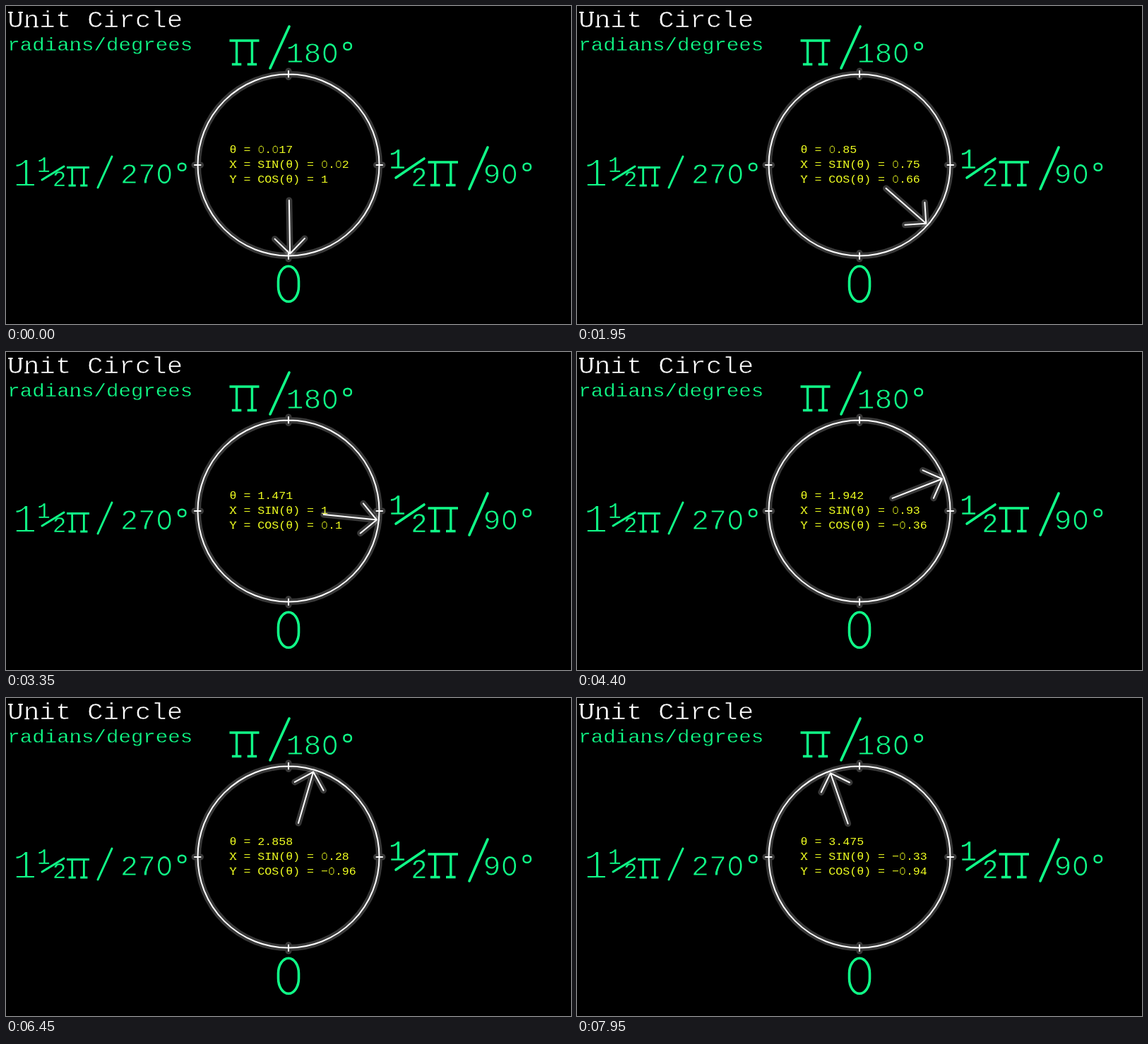
Write an HTML page with a canvas that moves like this. It is 800 px wide and 450 px high and loops after 8000 ms.

```html
<!DOCTYPE html>
<html lang="en">
<head>
<meta charset="utf-8">
<title>Unit Circle</title>
<style>
html, body { margin: 0; width: 100%; height: 100%; overflow: hidden; background: #000; }
canvas { display: block; width: 800px; height: 450px; }
</style>
</head>
<body>
<canvas id="stage" width="800" height="450"></canvas>
<script>
const ctx = document.getElementById('stage').getContext('2d');
const GREEN = '#10ff88', YELLOW = '#f0ff20', WHITE = '#fff';
const HALO = 'rgba(255,255,255,.22)';
const CX = 400, CY = 225, R = 128.5;
const LOOP = 8000, STEP = 50;

// Angle in radians at given times, in ms
const angles = [[0, .017], [1950, .85], [3350, 1.471], [4400, 1.942],
                [5250, 2.325], [6450, 2.858], [7950, 3.475]];

// Slab feet in em from the glyph origin, y upwards
const SLABS = {
  U: [[.11, .64], [.49, .64]],
  n: [[.13, .02], [.47, .02]],
  X: [[.1, .64], [.5, .64], [.1, .02], [.5, .02]],
  Y: [[.1, .64], [.5, .64], [.3, .02]],
  N: [[.11, .64], [.11, .02], [.49, .64]]
};

function angleAt(t) {
  let i = 1;
  while (i < angles.length - 1 && t > angles[i][0]) i++;
  const [t0, a0] = angles[i - 1], [t1, a1] = angles[i];
  return a0 + (a1 - a0) * (t - t0) / (t1 - t0);
}

function oval(x, y, w, h, width) {
  ctx.lineWidth = width;
  ctx.beginPath();
  ctx.roundRect(x - w / 2, y - h / 2, w, h, { x: w / 2, y: h * .43 });
  ctx.stroke();
}

// Monospaced text with thin strokes, open zeros and slab feet
function write(text, x, y, size, color, { squash = 1, thin = .024 } = {}) {
  ctx.font = `${size}px "Liberation Mono", monospace`;
  ctx.fillStyle = ctx.strokeStyle = color;
  ctx.save();
  ctx.translate(x, y);
  ctx.scale(1, squash);
  for (const ch of text) {
    if (ch === '0') {
      oval(size * .3, -size * .33, size * .38, size * .61, size * .06);
    } else if (ch === '°') {
      oval(size * .3, -size * .57, size * .25, size * .25, size * .06);
    } else {
      ctx.fillText(ch, 0, 0);
      if (thin) {
        ctx.strokeStyle = '#000';
        ctx.lineWidth = size * thin;
        ctx.strokeText(ch, 0, 0);
        ctx.strokeStyle = color;
      }
      for (const [sx, sy] of SLABS[ch] || [])
        ctx.fillRect((sx - .09) * size, -(sy + .026) * size, .18 * size, .052 * size);
    }
    ctx.translate(size * .6, 0);
  }
  ctx.restore();
}

function lines(color, width, ...segments) {
  ctx.strokeStyle = color;
  ctx.lineWidth = width;
  ctx.beginPath();
  for (const [x0, y0, x1, y1] of segments) {
    ctx.moveTo(x0, y0);
    ctx.lineTo(x1, y1);
  }
  ctx.stroke();
}

function bigPi(x, y, w, h, width) {
  const a = x + w * .24, b = x + w * .76, s = w * .16, base = y + h;
  ctx.lineCap = 'butt';
  lines(GREEN, width, [x, y, x + w, y], [a, y, a, base], [b, y, b, base],
    [a - s, base, a + s, base], [b - s, base, b + s, base]);
  ctx.lineCap = 'round';
}

function labels() {
  write('Unit Circle', 2.2, 30, 37.6, WHITE, { squash: .87, thin: .02 });
  write('radians/degrees', 2.3, 62.5, 29.1, GREEN, { squash: .87, thin: .012 });

  const degrees = { squash: .98, thin: .02 };
  bigPi(316.5, 49, 42, 33.5, 3.4);
  lines(GREEN, 3.6, [374, 88, 401, 29]);
  write('180°', 396.5, 80, 41.5, GREEN, degrees);

  write('1', 542, 230, 40, GREEN, { thin: .01 });
  write('2', 573.5, 255, 38, GREEN, { thin: .01 });
  lines(GREEN, 3.6, [552, 243, 592, 216]);
  bigPi(597.5, 221, 42.5, 32.5, 3.4);
  lines(GREEN, 3.6, [656, 259, 682, 200]);
  write('90°', 675.5, 251, 41.5, GREEN, degrees);

  write('1', 9.5, 254.5, 57, GREEN, { thin: .035 });
  write('1', 44, 235, 31, GREEN, { thin: .01 });
  write('2', 66, 254.5, 32, GREEN, { thin: .01 });
  lines(GREEN, 3, [51, 246, 82, 227]);
  bigPi(86, 228.5, 32, 25.5, 2.8);
  lines(GREEN, 3, [130, 257, 150, 213]);
  write('270°', 162, 251, 41.5, GREEN, degrees);

  ctx.strokeStyle = GREEN;
  oval(400, 393.3, 29, 50, 3.6);
}

const round = (v, digits) => String(+v.toFixed(digits)).replace('-', '\u2212');

function readout(a) {
  const rows = [
    `θ = ${round(a, 3)}`,
    `X = SIN(θ) = ${round(Math.sin(a), 2)}`,
    `Y = COS(θ) = ${round(Math.cos(a), 2)}`
  ];
  rows.forEach((row, i) =>
    write(row, 316.5, 208 + i * 21, 16.6, YELLOW, { squash: .92, thin: 0 }));
}

function glow(path) {
  ctx.strokeStyle = HALO;
  ctx.lineWidth = 9;
  ctx.stroke(path);
  ctx.strokeStyle = WHITE;
  ctx.lineWidth = 2;
  ctx.stroke(path);
}

function dial() {
  const p = new Path2D();
  p.arc(CX, CY, R, 0, Math.PI * 2);
  for (let i = 0; i < 4; i++) {
    const c = Math.round(Math.cos(i * Math.PI / 2)), s = Math.round(Math.sin(i * Math.PI / 2));
    p.moveTo(CX + c * (R - 4), CY + s * (R - 4));
    p.lineTo(CX + c * (R + 4.5), CY + s * (R + 4.5));
  }
  return p;
}

function arrow() {
  const p = new Path2D();
  p.moveTo(0, 50);
  p.lineTo(0, 125.5);
  p.moveTo(-21.2, 104.3);
  p.lineTo(0, 125.5);
  p.lineTo(21.2, 104.3);
  return p;
}

const dialPath = dial(), arrowPath = arrow();

function draw(t) {
  const a = angleAt(t);
  ctx.fillStyle = '#000';
  ctx.fillRect(0, 0, 800, 450);
  ctx.lineCap = ctx.lineJoin = 'round';
  labels();
  readout(a);
  glow(dialPath);
  ctx.save();
  ctx.translate(CX, CY);
  ctx.rotate(-a);
  glow(arrowPath);
  ctx.restore();
}

const start = performance.now();
function tick() {
  const t = (performance.now() - start) % LOOP;
  draw(Math.floor(t / STEP) * STEP);
  requestAnimationFrame(tick);
}
tick();
</script>
</body>
</html>
```
